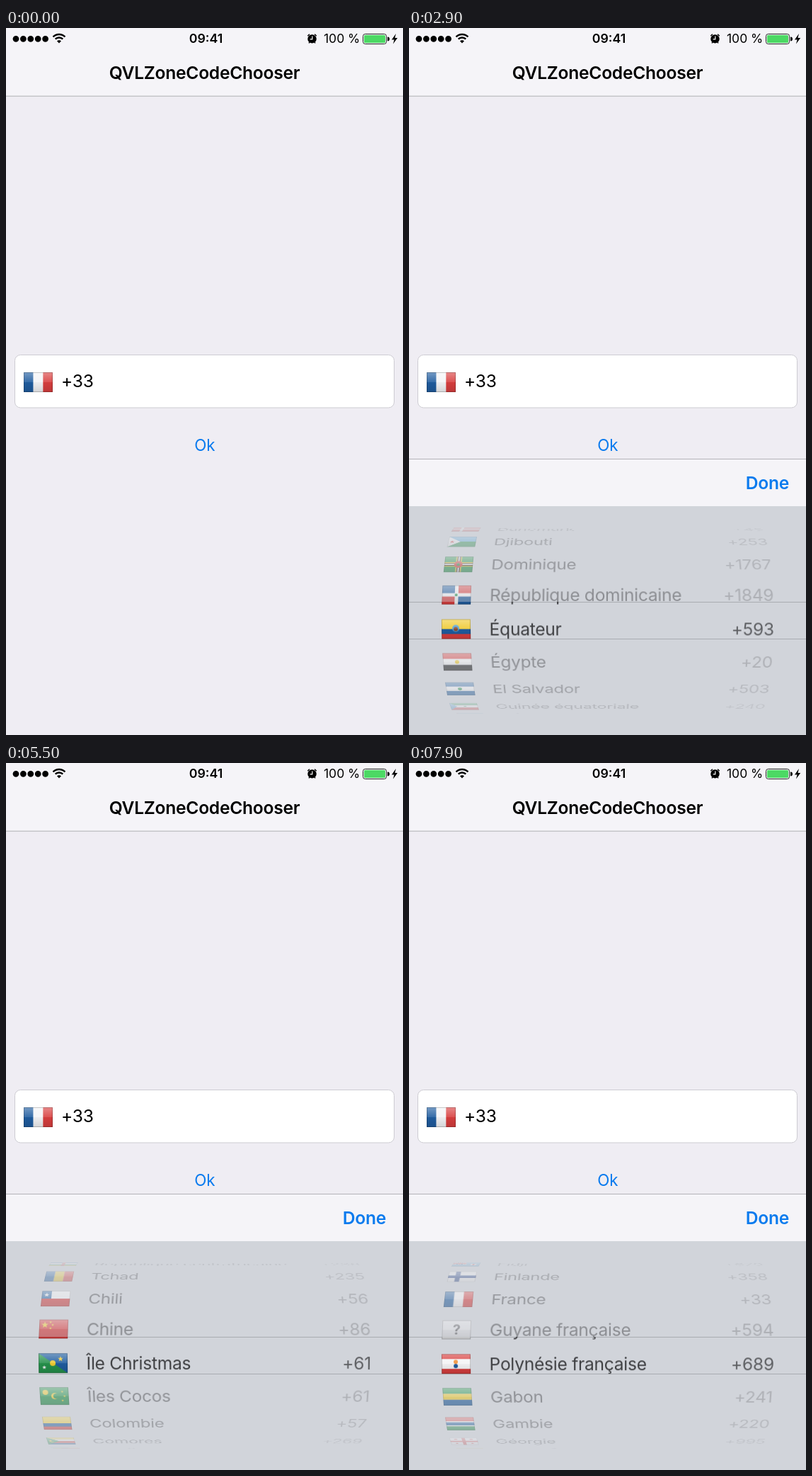
Animation, 561 px wide and 998 px high, one loop 8000 ms. Source, as an HTML page:

```html
<!DOCTYPE html>
<html lang="fr">
<head>
<meta charset="utf-8">
<title>Dial code picker</title>
<style>
html, body { margin: 0; width: 100%; height: 100%; overflow: hidden; background: #efedf3; }
body { position: relative; font: 24.6px/28px Inter, sans-serif; letter-spacing: -.011em; }
#screen { position: absolute; left: 0; top: 0; }
#panel { position: absolute; left: 0; top: 608px; width: 561px; height: 390px; background: #d1d4da; }
#bar { position: absolute; left: 0; top: 0; width: 561px; height: 67px; box-sizing: border-box;
  background: #f5f4f8; border-top: 1px solid #b3b3b8; }
#bar b { position: absolute; right: 24px; top: 19px; font-weight: 600; color: #0b7bee; }
#band { position: absolute; left: 0; top: 202px; width: 561px; height: 53px; overflow: hidden;
  background: #d1d4da; box-shadow: inset 0 1px #a9acb1, inset 0 -1px #a9acb1; }
.row { position: absolute; left: 0; width: 561px; height: 28px; white-space: nowrap; }
.row > * { position: absolute; top: 0; }
.row svg { left: 46px; }
.row span { left: 113.6px; }
.row i { right: 45px; font-style: normal; }
#wheel .row { top: 213.5px; color: #606165; }
#wheel i { opacity: .52; }
#band .row { top: 11.5px; color: #3e3f42; }
#band i { opacity: .78; }
</style>
</head>
<body>
<svg id="screen" width="561" height="998">
  <defs>
    <linearGradient id="gloss" x2="0" y2="1">
      <stop offset="0" stop-color="#fff" stop-opacity=".38"/>
      <stop offset=".5" stop-color="#fff" stop-opacity=".1"/>
      <stop offset=".52" stop-color="#000" stop-opacity=".03"/>
      <stop offset="1" stop-color="#000" stop-opacity=".13"/>
    </linearGradient>
  </defs>
  <rect width="561" height="96" fill="#f5f4f8"/>
  <rect y="95.7" width="561" height=".9" fill="#a9a9ad"/>
  <path d="M14 15.3h43" stroke="#000" stroke-width="8.8" stroke-linecap="round" stroke-dasharray="0 10.4"/>
  <path d="M66.5 12.5a12 12 0 0 1 17 0M69.7 15.7a7.5 7.5 0 0 1 10.6 0" fill="none" stroke="#000" stroke-width="2.4"/>
  <path d="M75 21.5l-3-3a4.2 4.2 0 0 1 6 0z"/>
  <g letter-spacing="0">
    <text x="282.5" y="21.4" text-anchor="middle" font-size="17.8" font-weight="600">09:41</text>
    <text x="449" y="21.4" font-size="17.5">100 %</text>
  </g>
  <circle cx="432.5" cy="15.4" r="6.2"/>
  <path d="M426.3 11.2l2.6-2.4M438.7 11.2l-2.6-2.4M429 20l-1 1.4M436 20l1 1.4" stroke="#000" stroke-width="1.5"/>
  <path d="M432.8 11.4v4.4h-3.2" fill="none" stroke="#fff" stroke-width="1.2"/>
  <rect x="504.5" y="8.5" width="33" height="14" rx="3" fill="#f5f4f8" stroke="#222"/>
  <rect x="506" y="10" width="30" height="11" rx="1.5" fill="#4cd964"/>
  <path d="M539 12.5a3 3 0 0 1 0 6z"/>
  <path d="M551 8l-6 8.5h3.6l-1.6 6 6.2-8.5h-3.7z"/>
  <text x="280.5" y="72" text-anchor="middle" font-weight="600">QVLZoneCodeChooser</text>
  <rect x="12.5" y="461.5" width="536" height="74.5" rx="8" fill="#fff" stroke="#cdccd2"/>
  <g id="chosen" transform="translate(25 486)"></g>
  <text x="78" y="507">+33</text>
  <text x="280.8" y="597" text-anchor="middle" font-size="22.4" fill="#0b7bee">Ok</text>
</svg>
<div id="panel">
  <div id="wheel"></div>
  <div id="band"></div>
  <div id="bar"><b>Done</b></div>
</div>
<script>
// One country per line: name | dial code | flag layers (operator, colour letters, parameters).
const countries = `Botswana|+267|hsswkwss
Brésil|+55|hg pyM20,3L38,14L20,25L3,14z ob
Territoire britannique de l’…|+246|hwbwbwb u og31,14,4
Brunéi Darussalam|+673|hy ew9 ek4 or
Bulgarie|+359|hwgr
Burkina Faso|+226|hrg sy
Burundi|+257|hg prM0,0H41L0,28H41z xw5 ow20,14,8 sr20,10,3 sr17,16,3 sr24,16,3
Cambodge|+855|hbrrb pwM11,19V16L14,12L17,15L20,9L24,15L27,12L30,16V19z
Cameroun|+237|vgry sy
Canada|+1|vrwwr sr20,14,7
Cap-Vert|+238|hbbbwrwb oy15,18,3
Îles Caïmans|+345|hn u ow31,14,5
République centrafricaine|+236|hbwgy prM18,0H23V28H18z
Tchad|+235|vbyr
Chili|+56|hwr qb14 sw7,7,4
Chine|+86|hr sy8,8,5 sy16,4,2 sy19,8,2 sy16,13,2
Île Christmas|+61|hb pgM0,0V28H41z oy20,14,4 sw8,20,3 sy31,8,4
Îles Cocos|+61|hg oy8,8,4 oy21,14,5 og23,14,4 sy32,7,2 sy35,14,2 sy32,21,2
Colombie|+57|hyybr
Comores|+269|hywrb tg oy7,14,4 og9,14,3
Congo-Brazzaville|+242|hg prM41,0V28H0z dy11
Congo-Kinshasa|+243|hs dy9 dr6 sy7,7,5
Îles Cook|+682|hn u Rw31,14,6
Costa Rica|+506|hbwrrwb
Côte d’Ivoire|+225|vowg
Croatie|+385|hrwb pwM15,8H26V17L20,21L15,17z prM15,8H19V12H23V8H26V12H23V16H19V12H15z
Cuba|+53|hbwbwb tr sw6,14,4
Chypre|+357|hw poM12,10L20,11L29,7L24,16L15,17z
Tchéquie|+420|hwr tb
Danemark|+45|hr nw4
Djibouti|+253|hsg tw sr6,14,4
Dominique|+1767|hg cy8 ck5 cw2 or20,14,6 sg20,14,4
République dominicaine|+1849|hbr prM20,0H41V14H20z pbM20,14H41V28H20z cw5 og20,14,2
Équateur|+593|hyybr os20,13,5 om20,14,3
Égypte|+20|hrwk oy20,14,3
El Salvador|+503|hbwb og20,14,3
Guinée équatoriale|+240|hgwr ts10 og22,14,2
Érythrée|+291|hgs tr41 oy10,14,4
Estonie|+372|hskw
Éthiopie|+251|hgyr ob sy20,14,4
Îles Malouines|+500|hn u ow31,14,5 og31,14,3
Îles Féroé|+298|hw nb8 nr4
Fidji|+679|hs u pwM27,8H36V17L31,21L27,17z prM27,8H36V11H33V19H30V11H27z
Finlande|+358|hw nn7
France|+33|vbwr
Guyane française|+594|he ?k
Polynésie française|+689|hrwwr oo20,11,3 ob20,17,3
Gabon|+241|hgyb
Gambie|+220|hrrrrwbbbwgggg
Géorgie|+995|hw cr5 sr9,6,3 sr32,6,3 sr9,22,3 sr32,22,3
Allemagne|+49|hkry
Ghana|+233|hryg sk`.split('\n').map(line => line.split('|'));

const colours = { r: '#d83e3e', w: '#f4f4f6', b: '#1f5c9f', n: '#213f86', s: '#4da0d8', g: '#25914b',
  y: '#efca30', o: '#f08a2c', k: '#2b2b2d', m: '#8a4a2c', e: '#dcdde0' };
const W = 41, H = 28;
const path = (c, d) => `<path fill="${colours[c]}" d="${d}"/>`;
const rect = (c, x, y, w, h) => path(c, `M${x} ${y}h${w}v${h}h${-w}z`);
const line = (c, w, d) => `<path fill="none" stroke="${colours[c]}" stroke-width="${w}" d="${d}"/>`;
const cross = (c, x, w) => rect(c, x - w / 2, 0, w, H) + rect(c, 0, H / 2 - w / 2, W, w);
const stripes = (cs, draw) => [...cs].map((c, i) => draw(c, i / cs.length, 1 / cs.length)).join('');
const rising = `M0 ${H}L${W} 0`, falling = `M0 0L${W} ${H}`;

const layers = {
  h: cs => stripes(cs, (c, at, size) => rect(c, 0, at * H, W, size * H)),
  v: cs => stripes(cs, (c, at, size) => rect(c, at * W, 0, size * W, H)),
  t: (c, length = 18) => path(c, `M0 0L${length} ${H / 2}L0 ${H}z`),
  q: (c, size) => rect(c, 0, 0, size, size),
  n: (c, w) => cross(c, 14, +w),
  c: (c, w) => cross(c, W / 2, +w),
  d: (c, w) => line(c, w, rising),
  e: (c, w) => line(c, w, falling),
  x: (c, w) => line(c, w, rising + falling),
  p: (c, ...d) => path(c, d.join(',')),
  o: (c, x = 20.5, y = 14, r = 5) => `<circle cx="${x}" cy="${y}" r="${r}" fill="${colours[c]}"/>`,
  R: (c, x, y, r) => `<circle cx="${x}" cy="${y}" r="${r}" fill="none" stroke="${colours[c]}" stroke-width="2" stroke-dasharray="2 1.8"/>`,
  s(c, x = 20.5, y = 14, r = 5) {
    const points = Array.from({ length: 10 }, (_, i) => {
      const a = i * Math.PI / 5, size = i % 2 ? r * .42 : r;
      return `${+x + size * Math.sin(a)} ${y - size * Math.cos(a)}`;
    });
    return path(c, `M${points.join('L')}z`);
  },
  u: () => `<g transform="scale(.49 .5)">${rect('n', 0, 0, W, H)}${layers.x('w', 6)}${layers.x('r', 2)}` +
    `${cross('w', W / 2, 9)}${cross('r', W / 2, 5)}</g>`,
  '?': c => `<text x="20.5" y="21" text-anchor="middle" font-size="20" font-weight="700" fill="${colours[c]}" opacity=".65">?</text>`
};

function flag(spec) {
  const art = spec.split(' ').map(layer => {
    const [, op, cs, rest] = layer.match(/^(.)([a-z]*)(.*)$/);
    return layers[op](cs, ...(rest ? rest.split(',') : []));
  }).join('');
  return `<svg width="${W}" height="${H}">${art}<rect width="${W}" height="${H}" fill="url(#gloss)"/>` +
    `<rect x=".5" y=".5" width="${W - 1}" height="${H - 1}" fill="none" stroke="#000" stroke-opacity=".2"/></svg>`;
}

const $ = id => document.getElementById(id);
const home = countries.findIndex(c => c[0] === 'France');
$('chosen').innerHTML = flag(countries[home][2]);
const rowsHtml = countries.map(([name, code, spec]) =>
  `<div class="row">${flag(spec)}<span>${name}</span><i>${code}</i></div>`).join('');
const [dimRows, brightRows] = ['wheel', 'band'].map(id => {
  $(id).innerHTML = rowsHtml;
  return [...$(id).children];
});

const STEP = 19.4, RADIUS = 144;
// Flicks of the wheel: start time and rows travelled, each slowing down exponentially.
const flicks = [[2656, -29.15], [4150, -12.32], [5150, 24.46], [6500, 20.07]];
const wheelAt = t => flicks.reduce((p, [start, rows]) =>
  p + (t > start ? rows * (1 - Math.exp((start - t) / 500)) : 0), home);

function draw() {
  const t = Math.floor(performance.now() % 8000 / 100) * 100;
  const hidden = t < 1500 ? 390 : 390 * Math.exp((1420 - t) / 90);
  $('panel').style.transform = `translateY(${hidden}px)`;
  const position = wheelAt(t);
  countries.forEach((_, i) => {
    const angle = (i - position) * STEP;
    const visible = Math.abs(angle) < 89;
    for (const { style } of [dimRows[i], brightRows[i]]) {
      style.display = visible ? '' : 'none';
      style.transform = `perspective(1400px) translateZ(${-RADIUS}px) rotateX(${-angle}deg) translateZ(${RADIUS}px)`;
    }
    if (visible) dimRows[i].style.opacity = .64 * Math.cos(angle * Math.PI / 180) ** 1.2;
  });
  requestAnimationFrame(draw);
}
draw();
</script>
</body>
</html>
```
